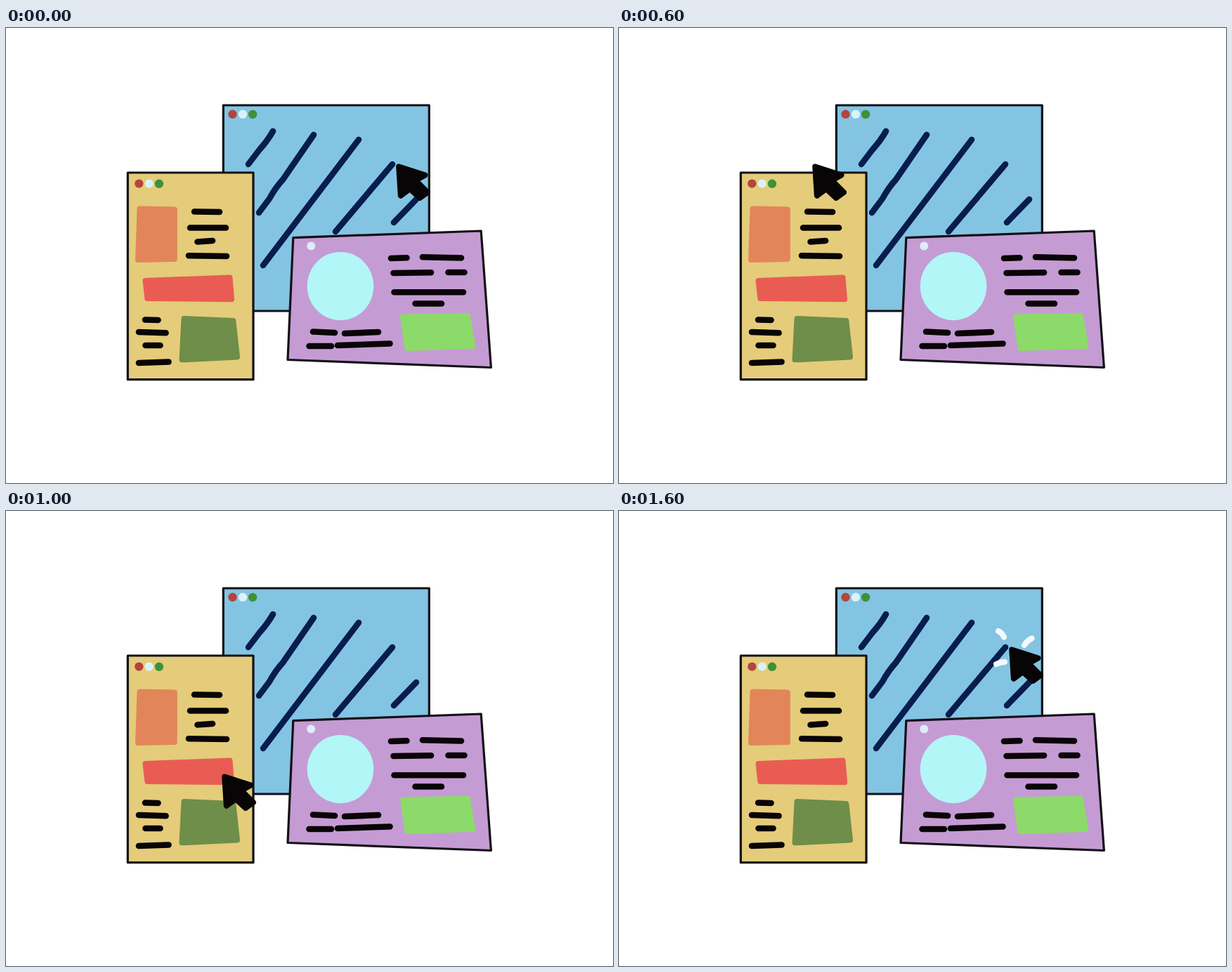
An HTML page that plays this animation: 864x648 px, repeating every 1800 ms.

```html
<!DOCTYPE html>
<html lang="en">
<head>
<meta charset="utf-8">
<title>Clicking through windows</title>
<style>
  html, body { margin: 0; width: 100%; height: 100%; overflow: hidden; background: #fff; }
  svg { display: block; width: 864px; height: 648px; }

  .frame { stroke: #121116; stroke-width: 3.2; stroke-linejoin: round; }
  .block { stroke-width: 8; stroke-linejoin: round; }
  .stripes, .bars, .spark { fill: none; stroke-linecap: round; stroke-linejoin: round; }
  .stripes { stroke: #081d4e; stroke-width: 8.6; }
  .bars { stroke: #090506; stroke-width: 8.6; }
  .spark { stroke: #f3f9fe; stroke-width: 8; }
  .cursor { fill: #080506; stroke: #080506; stroke-width: 8; stroke-linejoin: round; }

  .cursor { animation: move 1800ms step-end infinite; }
  .spark {
    visibility: hidden;
    animation: flash 1800ms step-end calc(var(--at) - 1800ms) infinite;
  }

  @keyframes move {
    0%      { transform: translate(0, 0); }
    11.111% { transform: translate(-107px, 0); }
    22.222% { transform: translate(-210px, 0); }
    33.333% { transform: translate(-280px, 0); }
    44.444% { transform: translate(-307px, 79px); }
    55.555% { transform: translate(-248px, 181px); }
    66.666% { transform: translate(-111px, 193px); }
    77.777% { transform: translate(-35px, 131px); }
    88.888%, 100% { transform: translate(0, 0); }
  }
  @keyframes flash {
    0% { visibility: visible; }
    11.111%, 100% { visibility: hidden; }
  }
</style>
</head>
<body>
<svg viewBox="0 0 864 648">
  <defs>
    <g id="dots">
      <circle r="6.2" fill="#b5443b"/>
      <circle r="6.2" cx="14.4" fill="#d9f3f8"/>
      <circle r="6.2" cx="28.6" cy=".2" fill="#3f9137"/>
    </g>
  </defs>

  <!-- Blue window -->
  <path class="frame" fill="#84c4e3" d="M309.3 110H602.3V403H309.3Z"/>
  <use href="#dots" x="322.5" y="122.8"/>
  <path class="stripes" d="M380 147Q372 161 361 173L345 194M438 152L394 216Q383 228 375 243L360 263M502 159L366 338M550 194L469 290M584 244L552 277"/>

  <!-- Yellow window -->
  <path class="frame" fill="#e4cc7a" d="M173.3 206H352V500.7H173.3Z"/>
  <use href="#dots" x="189.3" y="221.6"/>
  <path class="block" fill="#e2865a" stroke="#e2865a" d="M190.5 257.5L239.8 258.5V329L188 330Z"/>
  <path class="block" fill="#e95c54" stroke="#e95c54" d="M198.5 360L318.5 355.5L321 386.2L201.3 385Z"/>
  <path class="block" fill="#6e8e49" stroke="#6e8e49" d="M253.5 414L323.3 417L329 468.5L250.5 472.3Z"/>
  <path class="bars" d="M268 261.5L304 262M262 284.5H313M272.5 304.5L294 303M260 324.2L314 325M198 415.5L216.5 416M189 433L227.5 434.3M198.5 452H219.5M189 477L231.5 475.5"/>

  <!-- Purple window -->
  <path class="frame" fill="#c59bd4" d="M408.8 298.6L676.2 289L690.4 483.5L401 472.5Z"/>
  <circle cx="434.2" cy="310.6" r="6" fill="#dcecf8"/>
  <ellipse cx="476" cy="367.6" rx="47.3" ry="48.7" fill="#b3f6f8"/>
  <path class="block" fill="#8cda69" stroke="#8cda69" d="M565 411.5L657 409.8L664.3 453L571.5 456Z"/>
  <path class="bars" d="M548 328L570.5 327.3M593 326.2L648 327.5M551.5 349L605 348.2M629.5 348H652.5M552.5 376.2H651M582.5 392.5H620M437 432.5L468 434M482 435L530 433M431.5 453H463M472 452L546.5 449.5"/>

  <!-- Click marks -->
  <path class="spark" style="--at:400ms" d="M333 172.5L338 185M370 189.5Q375 184 383 181.5M319.5 215L333 207"/>
  <path class="spark" style="--at:800ms" d="M232 259L240 268M270 266Q273 262 280 259.5M225 287L238 282"/>
  <path class="spark" style="--at:1200ms" d="M430 364L436 375M466 381Q469 376 476 372.5M422 411L436 405"/>
  <path class="spark" style="--at:1600ms" d="M540 171Q545 173 548 179.5M577 191Q581 184.5 587.5 181.5M537 218Q543 215 549 215"/>

  <path class="cursor" d="M559.2 197.5L596.5 209.5L583 217L600 234L589 242L575 229L561.8 238.7Z"/>
</svg>
</body>
</html>
```
